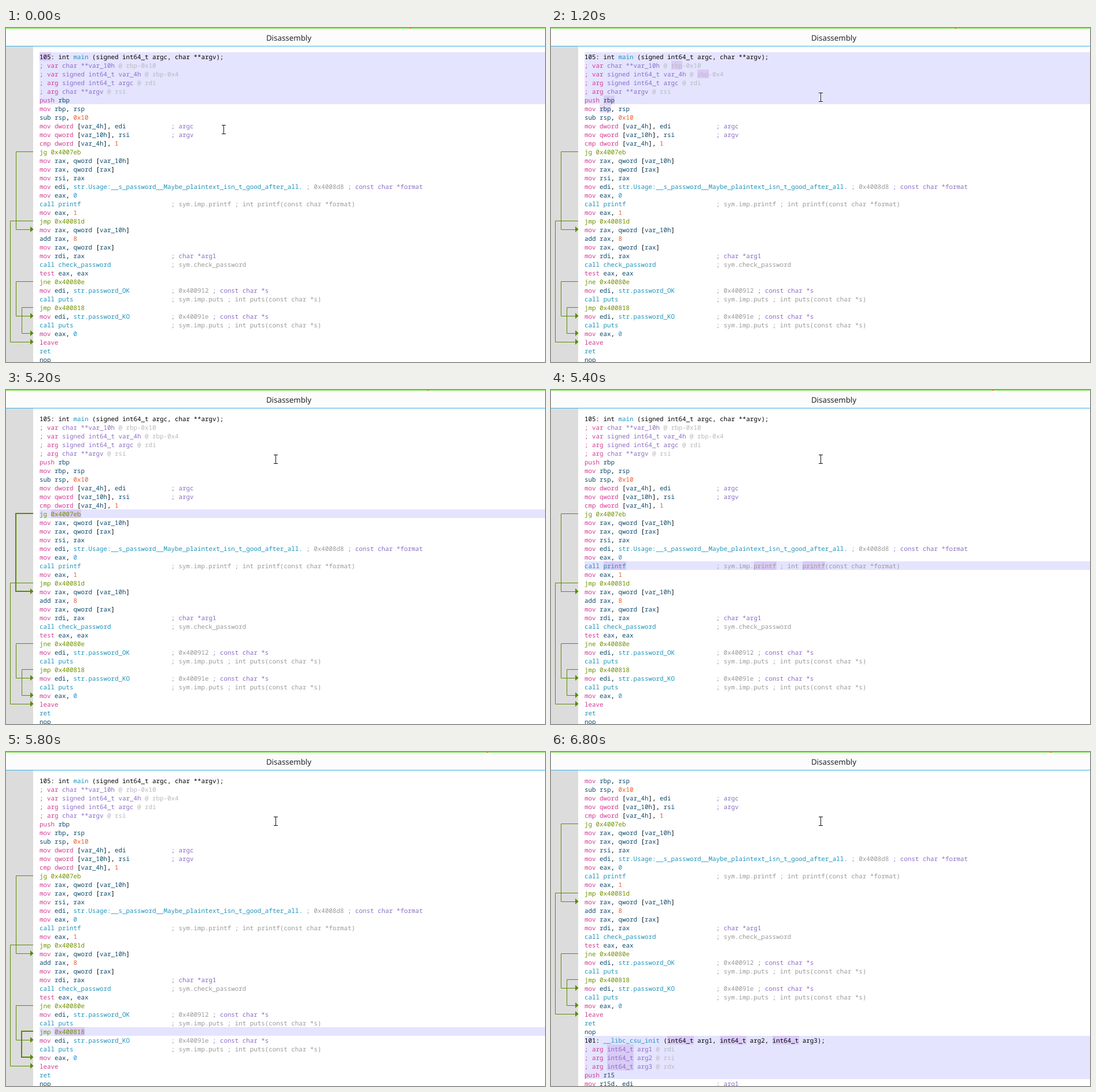
Recreate the animation shown at these times as an HTML page. Size 932 px wide and 579 px high, loop 8000 ms.

```html
<!DOCTYPE html>
<html lang="en">
<head>
<meta charset="utf-8">
<title>Disassembly</title>
<style>
html, body { margin: 0; width: 100%; height: 100%; overflow: hidden; background: #fff; }
#stage { position: relative; width: 932px; height: 579px; overflow: hidden; background: #fff; }
#stage div, #stage svg { position: absolute; }
#head { left: 0; top: 0; width: 932px; height: 31px; background: #fcfcfc; border-bottom: 1px solid #3daee9; }
#bar { left: 0; top: 0; width: 932px; height: 1px; background: #6be234; }
#tick { top: 0; width: 3px; height: 1px; background: #e8381c; }
#title { left: 389px; top: 8px; width: 200px; text-align: center; color: #232629;
  font: 13.333px/18px "Noto Sans", "Open Sans", sans-serif; text-rendering: geometricPrecision; }
#gutter { left: 0; top: 32px; width: 47px; height: 547px; background: #dcdcdc; }
#view { left: 0; top: 42px; width: 932px; height: 537px; overflow: hidden; }
#page { left: 0; top: 0; width: 932px; height: 640px; }
#line { left: 58px; width: 874px; background: #e4e4ff; }
.word { height: 15px; background: rgba(179, 119, 214, .235); }
.row { left: 58px; height: 15px; margin-top: 1px; white-space: pre; color: #000;
  font: 10.8333px/15px "Noto Sans Mono", "DejaVu Sans Mono", monospace; text-rendering: geometricPrecision;
  font-variant-ligatures: none; }
.op { color: #d33a94 } .call { color: #1e93bb } .jump { color: #6f9100 } .reg { color: #0d4a6c }
.num { color: #ea5a28 } .zero { color: #268bd2 } .note { color: #8d6cc6 } .dim { color: #999 } .at { color: #b9b9bf }
</style>
</head>
<body>
<div id="stage">
  <div id="head"></div>
  <div id="bar"></div>
  <div id="tick"></div>
  <div id="title">Disassembly</div>
  <div id="gutter"></div>
  <div id="view"><div id="page">
    <div id="line"></div>
    <div id="words"></div>
    <svg id="arrows" width="48" height="640"></svg>
  </div></div>
  <svg id="mouse" width="11" height="20" viewBox="-5.5 -10 11 20" fill="none">
    <g id="beam"><path d="M-3.5 -7.5H3.5M0 -7V7M-3.5 7.5H3.5"/></g>
  </svg>
</div>
<script>
const ROW = 15, COL = 6.5, LEFT = 58, LOOP = 8000;

const code = `105: int main (signed int64_t argc, char **argv);
; var char **var_10h @ rbp-0x10
; var signed int64_t var_4h @ rbp-0x4
; arg signed int64_t argc @ rdi
; arg char **argv @ rsi
push rbp
mov rbp, rsp
sub rsp, 0x10
mov dword [var_4h], edi|; argc
mov qword [var_10h], rsi|; argv
cmp dword [var_4h], 1
jg 0x4007eb
mov rax, qword [var_10h]
mov rax, qword [rax]
mov rsi, rax
mov edi, str.Usage:__s_password__Maybe_plaintext_isn_t_good_after_all.|; 0x4008d8 ; const char *format
mov eax, 0
call printf|; sym.imp.printf ; int printf(const char *format)
mov eax, 1
jmp 0x40081d
mov rax, qword [var_10h]
add rax, 8
mov rax, qword [rax]
mov rdi, rax|; char *arg1
call check_password|; sym.check_password
test eax, eax
jne 0x40080e
mov edi, str.password_OK|; 0x400912 ; const char *s
call puts|; sym.imp.puts ; int puts(const char *s)
jmp 0x400818
mov edi, str.password_KO|; 0x40091e ; const char *s
call puts|; sym.imp.puts ; int puts(const char *s)
mov eax, 0
leave
ret
nop
101: __libc_csu_init (int64_t arg1, int64_t arg2, int64_t arg3);
; arg int64_t arg1 @ rdi
; arg int64_t arg2 @ rsi
; arg int64_t arg3 @ rdx
push r15
mov r15d, edi|; arg1`.split("\n");

// Rows that share one address light up together: [first, last]
const blocks = [[0, 5], [36, 40]];

// Jumps: [from row, to row, x]
const jumps = [[11, 20, 17.5], [19, 33, 7.5], [26, 30, 17.5], [29, 32, 27.5]];

// Caret steps: [ms, row, word, top row, tick x]
const steps = [
  [0, 0, "105", 0, 699],
  [1200, 5, "rbp", 0, 699],
  [4600, 6, ",", 0, 701],
  [5100, 8, "dword", 0, 711],
  [5200, 11, "0x4007eb", 0, 729],
  [5300, 14, ",", 0, 742],
  [5400, 17, "printf", 0, 763],
  [5500, 21, ",", 0, 787],
  [5600, 24, "check_password", 0, 803],
  [5700, 27, ",", 0, 817],
  [5800, 29, "0x400818", 0, 832],
  [6100, 30, ",", 0, 835],
  [6600, 33, "leave", 0, 858],
  [6700, 36, "__libc_csu_init", 6, 864],
  [6800, 39, "int64_t", 6, 864]
];

// Pointer steps: [ms, x, y]
const moves = [
  [0, 376.5, 176], [300, 377.5, 179], [400, 388.5, 175], [500, 406.5, 162], [600, 425.5, 146],
  [700, 442.5, 131], [800, 455.5, 120], [900, 463.5, 115], [1000, 466.5, 120]
];

const $ = id => document.getElementById(id);

function svg(parent, tag, attrs) {
  const el = document.createElementNS("http://www.w3.org/2000/svg", tag);
  for (const k in attrs) el.setAttribute(k, attrs[k]);
  return parent.appendChild(el);
}

const opKind = { ret: "call", nop: "reg", add: "reg", sub: "reg" };

// Splits a row into [class, text] pairs
function paint(row) {
  let m;
  if (m = row.match(/^(; \w+)( [^@]*)(@.*)$/)) return [["op", m[1]], ["note", m[2]], ["at", m[3]]];
  if (m = row.match(/^(\d+: (?:int )?)(\w+)(.*)$/)) return [["", m[1]], ["call", m[2]], ["", m[3]]];

  const [body, note] = row.split("|");
  const out = [];
  if (body[0] === "j") out.push(["jump", body]);
  else if (/^call/.test(body)) out.push(["call", body]);
  else {
    const op = body.match(/^\w+( [dq]word)?/)[0];
    out.push([opKind[op] || "op", op]);
    for (const t of body.slice(op.length).match(/str\.\S+|\w+|\W+/g) || []) {
      const kind = /^str/.test(t) ? "call" : t === "0" ? "zero" : /^\d/.test(t) ? "num" : /^\w/.test(t) ? "reg" : "";
      out.push([kind, t]);
    }
  }
  if (note) {
    out.push(["", " ".repeat(Math.max(1, 35 - body.length))]);
    if (m = note.match(/^(; 0x\w+ )(.*)$/)) out.push(["dim", m[1]], ["note", m[2]]);
    else out.push([/^; sym/.test(note) ? "dim" : "note", note]);
  }
  return out;
}

const plain = code.map((row, i) => {
  const div = document.createElement("div");
  div.className = "row";
  div.style.top = i * ROW + "px";
  for (const [kind, text] of paint(row)) {
    const span = document.createElement("span");
    span.className = kind;
    span.textContent = text;
    div.append(span);
  }
  $("page").append(div);
  return div.textContent;
});

const lines = jumps.map(([from, to, x]) => {
  const y = to * ROW + 7;
  svg($("arrows"), "path", { d: `M42 ${y - 5}L47.5 ${y}L42 ${y + 5}Z`, fill: "#5a8a00" });
  return svg($("arrows"), "path", { fill: "none", stroke: "#5a8a00" });
});

const beam = $("beam").firstElementChild;
const halo = beam.cloneNode();
$("beam").prepend(halo);
halo.setAttribute("stroke", "#fff");
halo.setAttribute("stroke-width", 2.6);
halo.setAttribute("stroke-opacity", .8);
beam.setAttribute("stroke", "#111");

function markWords(word) {
  $("words").textContent = "";
  const find = new RegExp(`(?<![a-z0-9])${word}(?![a-z0-9])`, "gi");
  plain.forEach((text, i) => {
    for (const hit of text.matchAll(find)) {
      const div = document.createElement("div");
      div.className = "word";
      div.style.left = LEFT + hit.index * COL + "px";
      div.style.top = i * ROW + "px";
      div.style.width = word.length * COL + "px";
      $("words").append(div);
    }
  });
}

function show([, row, word, top, tick]) {
  const [a, b] = blocks.find(([p, q]) => row >= p && row <= q) || [row, row];
  $("line").style.top = a * ROW + "px";
  $("line").style.height = (b - a + 1) * ROW + "px";
  $("page").style.top = -top * ROW + "px";
  $("tick").style.left = tick - 1 + "px";
  markWords(word);
  jumps.forEach(([from, to, x], i) => {
    const bold = row === from || row === to;
    const d = bold ? 7 : 7.5;
    lines[i].setAttribute("stroke-width", bold ? 2 : 1);
    lines[i].setAttribute("d", `M47 ${from * ROW + d}H${bold ? x - .5 : x}V${to * ROW + d}H${bold ? 45 : 47}`);
  });
}

const at = (table, t) => table.filter(s => s[0] <= t).pop();
const start = performance.now();
let last;

function frame() {
  const t = (performance.now() - start) % LOOP;
  const step = at(steps, t);
  if (step !== last) show(last = step);
  const [, x, y] = at(moves, t);
  $("mouse").style.left = x - 5.5 + "px";
  $("mouse").style.top = y - 10 + "px";
  requestAnimationFrame(frame);
}
frame();
</script>
</body>
</html>
```
